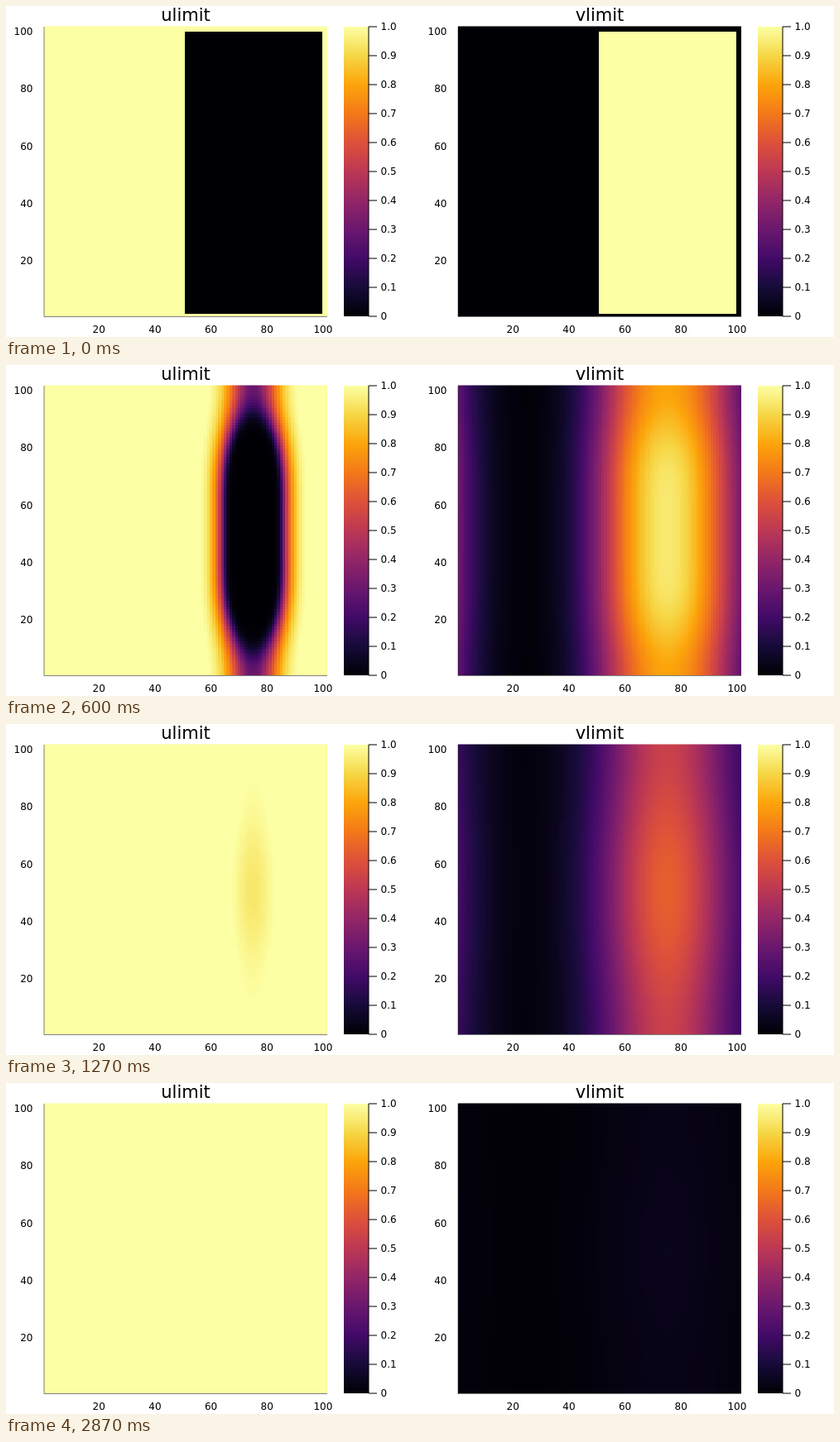
Write an HTML page with a canvas that moves like this. It is 1000x400 px and loops after 3.39 s.

```html
<!DOCTYPE html>
<html lang="en">
<head>
<meta charset="utf-8">
<title>ulimit / vlimit</title>
<style>
  html, body { margin: 0; width: 100%; height: 100%; overflow: hidden; background: #fff; }
  canvas, svg { position: absolute; left: 0; top: 0; width: 1000px; height: 400px; display: block; }
  text { font: 12px "DejaVu Sans", sans-serif; fill: #000; }
  .title { font-size: 21px; text-anchor: middle; }
  .mid { text-anchor: middle; }
  .end { text-anchor: end; }
</style>
</head>
<body>
<canvas id="maps" width="1000" height="400"></canvas>
<svg id="axes" viewBox="0 0 1000 400"></svg>
<script>
const N = 101, LOOP = 3390, STEP = 1000 / 15, LAST = 43;
const { exp, sin, abs, min, max, round, floor, PI } = Math;
const ctx = document.getElementById('maps').getContext('2d');
const axes = document.getElementById('axes');

// Inferno colour ramp: evenly spaced stops, 256 levels
const stops = '000004 160b39 420a68 6a176e 932667 bc3754 dd513a f37819 fca50a f6d746 fcffa4'
  .split(' ').map(hex => [0, 2, 4].map(i => parseInt(hex.substr(i, 2), 16)));
const ramp = Array.from({ length: 256 }, (_, k) => {
  const x = k / 255 * (stops.length - 1), i = min(floor(x), stops.length - 2);
  return `rgb(${stops[i].map((a, c) => round(a + (stops[i + 1][c] - a) * (x - i)))})`;
});
const color = v => ramp[round(255 * max(0, min(1, v)))];

const normal = z => 1 / (1 + exp(-1.5976 * z - .07056 * z ** 3));
const edgeX = i => round(46.3 + i * 3.386);
const edgeY = j => round(24.4 + j * 3.475);

// Start: a block where v has replaced u
function block() {
  const v = (x, y) => x > 50 && x < 100 && y > 1 && y < 100 ? 1 : 0;
  return [(x, y) => 1 - v(x, y), v];
}

// Later: the hole in u closes while v diffuses and decays, on a periodic grid
function fields(s) {
  if (!s) return block();

  const front = 289 - 22 * s + 200 * exp(-.6 * s);
  const spread = max(27, 54 - 1.7 * s) * (1 - exp(-s));
  const bend = 1.25 + 6.5 * exp(-s / 2.7);
  const power = 1 + 22 * exp(-s / 3.4);

  const half = 24.5 / (1 + (s / 22) ** 2);
  const blur = 4.7 * s ** .41;
  const peak = (1 + exp((s - 17.5) / 4)) ** -.5;
  const dip = .155 + .15 * exp(-s / 2);

  const band = d => normal((d + half) / blur) - normal((d - half) / blur);
  const rim = [], wave = [], close = [], fade = [];
  for (let k = 1; k <= N; k++) {
    const d = k - 75, near = min(abs(d), N - abs(d));
    const rise = sin(PI * (k - 50.5) / N) ** 2;
    const edge = rise ** power;
    rim[k] = exp((front - near * near) / (2 * spread));
    wave[k] = peak * (band(d) + band(d + N) + band(d - N)) / band(0);
    close[k] = exp(-bend * edge);
    fade[k] = 1 - dip * edge;
  }
  const u = (x, y) => {
    const w = max(0, rim[x] * close[y] - .03);
    return w > 4 ? 0 : 1 - w / (1 + w ** 8) ** .125;
  };
  return [u, (x, y) => wave[x] * fade[y]];
}

function drawMap(value, x0) {
  ctx.save();
  ctx.clearRect(x0 + 45, 23, 344, 354);
  ctx.beginPath();
  ctx.rect(x0 + 46, 24.6, 342, 350.4);
  ctx.clip();
  for (let x = 1; x <= N; x++) {
    const left = edgeX(x - 1), width = edgeX(x) - left;
    for (let y = 1; y <= N; y++) {
      const top = edgeY(N - y);
      ctx.fillStyle = color(value(x, y));
      ctx.fillRect(x0 + left, top, width, edgeY(N - y + 1) - top);
    }
  }
  ctx.restore();
}

function add(tag, attrs, text = '') {
  const el = document.createElementNS('http://www.w3.org/2000/svg', tag);
  for (const key in attrs) el.setAttribute(key, attrs[key]);
  el.textContent = text;
  axes.appendChild(el);
}
const line = (x1, y1, x2, y2, width = 1) =>
  add('line', { x1, y1, x2, y2, stroke: '#000', 'stroke-width': width });
const label = (x, y, text, cls = '') => add('text', { x, y, class: cls }, text);

function drawAxes(title, x0) {
  label(x0 + 217, 18, title, 'title');
  line(x0 + 46, 25, x0 + 46, 375.5, .5);
  line(x0 + 46, 375.5, x0 + 388, 375.5, .5);
  for (let k = 20; k <= 100; k += 20) {
    label(x0 + 44.6 + k * 3.383, 394.5, k, 'mid');
    label(x0 + 32.5, 381.7 - k * 3.469, k, 'end');
  }
  for (let y = 25; y < 375; y++) {
    ctx.fillStyle = color((374.5 - y) / 350);
    ctx.fillRect(x0 + 408, y, 30, 1);
  }
  line(x0 + 438, 25, x0 + 438, 375);
  for (let k = 0; k <= 10; k++) {
    const y = 375 - 35 * k;
    line(x0 + 438, y, x0 + 448, y);
    label(x0 + 452.5, y + 4.2, k ? (k / 10).toFixed(1) : '0');
  }
}

drawAxes('ulimit', 0);
drawAxes('vlimit', 500);

let shown = -1;
const start = performance.now();
function tick() {
  const t = (performance.now() - start) % LOOP;
  const step = min(LAST, floor((t + 4) / STEP));
  if (step !== shown) {
    shown = step;
    fields(step).forEach((value, side) => drawMap(value, side * 500));
  }
  requestAnimationFrame(tick);
}
tick();
</script>
</body>
</html>
```
